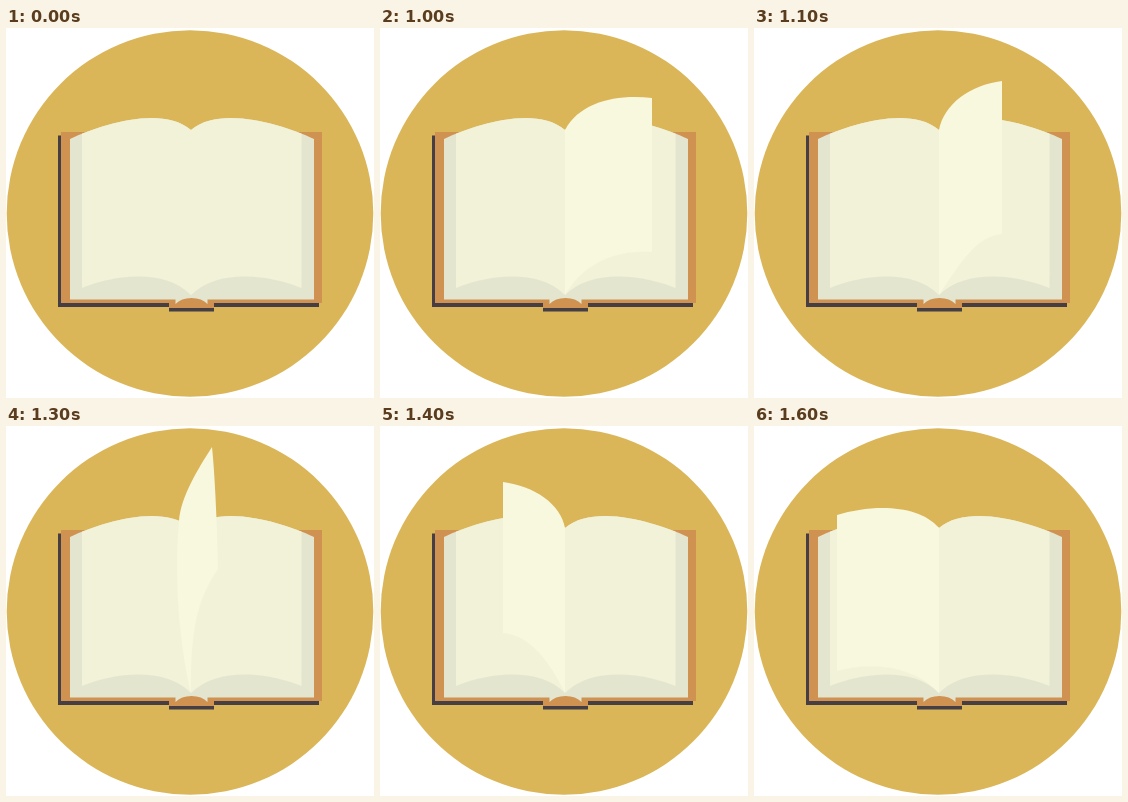
An HTML page that plays this animation: 368x370 px, repeating every 1.7 s.

```html
<!DOCTYPE html>
<html lang="en">
<head>
<meta charset="utf-8">
<title>Turning page</title>
<style>
  html, body { margin: 0; width: 100%; height: 100%; overflow: hidden; background: #fff; }
  svg { display: block; width: 100%; height: 100%; }
  .cover { fill: #cf9250; }
  .shadow { fill: #453f45; }
  /* Each pose shows for 100 ms of the 1700 ms loop, the first at 900 ms. */
  .leaf path {
    fill: #f8f8df;
    visibility: hidden;
    animation: pose 1700ms step-end calc(var(--i) * 100ms - 800ms) infinite;
  }
  @keyframes pose {
    0% { visibility: visible; }
    5.88235%, 100% { visibility: hidden; }
  }
</style>
</head>
<body>
<svg viewBox="0 0 368 370">
  <defs>
    <path id="block" d="M64 111C95 97 155 77 185 102C215 77 277 97 308 111V271.5H201.500V276Q196 270 185.500 270T169.500 276V271.500H64Z"/>
    <clipPath id="inside"><use href="#block"/></clipPath>
  </defs>
  <circle cx="184" cy="185.500" r="183.300" fill="#dab658"/>

  <path class="shadow" d="M52 107.500H313V279H52Z"/>
  <path class="shadow" d="M163 279H208V283.500H163Z"/>
  <path class="cover" d="M55 104H316V275H208V280H163V275H55Z"/>

  <use href="#block" fill="#e4e5cf"/>
  <path clip-path="url(#inside)" fill="#f2f2d9"
        d="M76 80H295.500V260C261 246 211 241 185 267C160 241 110 246 76 260Z"/>

  <g class="leaf">
    <path style="--i:0" d="M185 102C205 78 252 77 287 87V241C250 234 210 240 185 267Z"/>
    <path style="--i:1" d="M185 102C200 74 236 66 272 70V224C236 222 205 234 185 267Z"/>
    <path style="--i:2" d="M185 102C190 76 216 57 248 53V206C222 208 206 236 185 267Z"/>
    <path style="--i:3" d="M185 102C187 80 205 48 227 36V186C207 198 194 238 185 267Z"/>
    <path style="--i:4" d="M173 95C175 70 192 43 206 21Q210 60 212 143C195 168 184 195 185 267C176 230 167 165 173 95Z"/>
    <path style="--i:5" d="M185 102C181 78 154 60 123 56V207C148 209 168 232 185 267Z"/>
    <path style="--i:6" d="M185 102C170 75 134 68 99 72V226C134 222 165 234 185 267Z"/>
    <path style="--i:7" d="M185 102C165 78 118 78 83 89V245C118 235 160 240 185 267Z"/>
  </g>
</svg>
</body>
</html>
```
